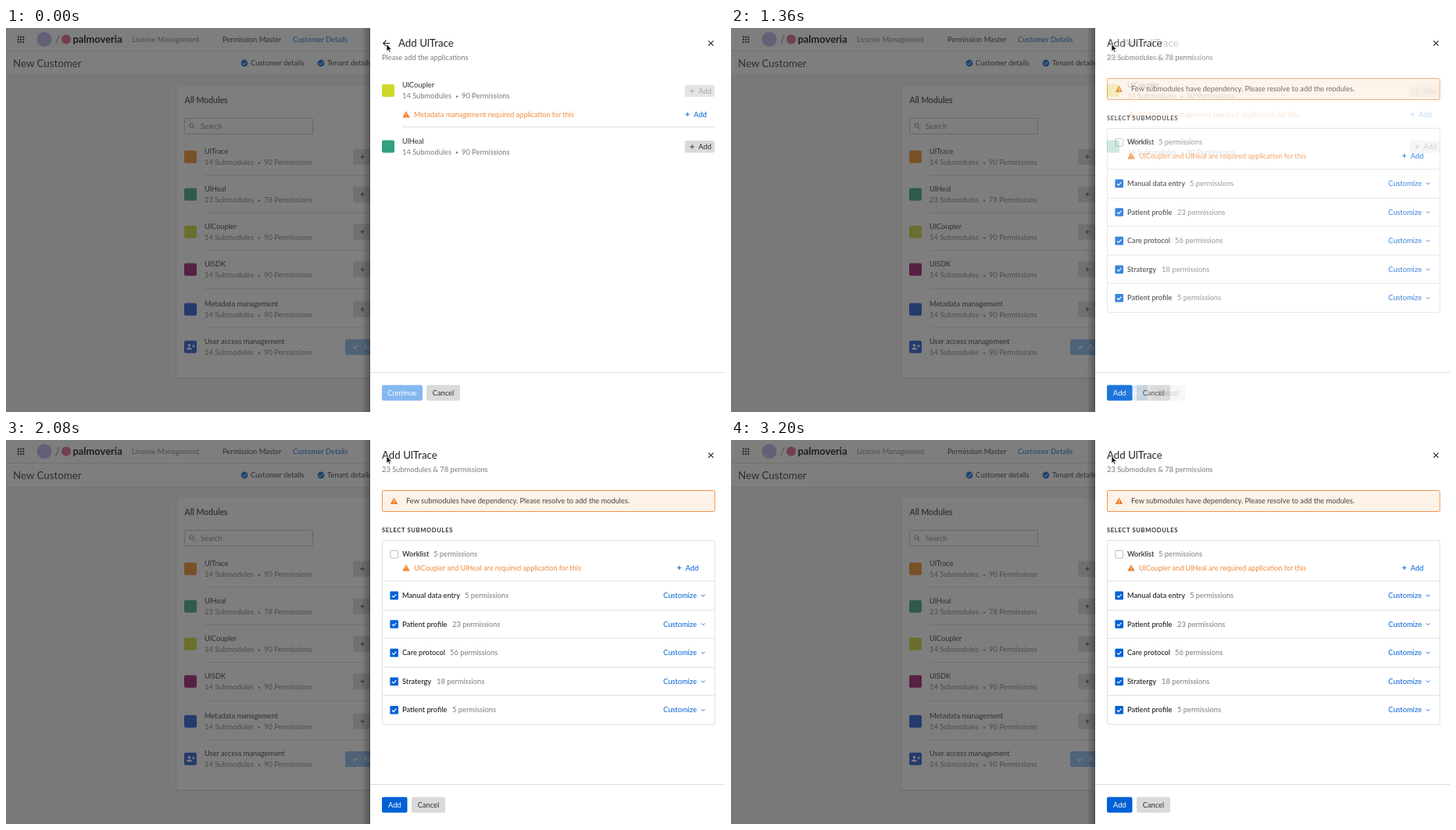
Animation, 920 px wide and 491 px high, one loop 3280 ms. Source, as an HTML page:

```html
<!DOCTYPE html>
<html lang="en">
<head>
<meta charset="utf-8">
<title>Add module dialog</title>
<style>
html, body { margin: 0; width: 100%; height: 100%; overflow: hidden; background: #fff; }
svg { display: block; width: 920px; height: 491px; font-family: Lato, "Open Sans", sans-serif; }
text { white-space: pre; }
</style>
</head>
<body>
<svg id="stage" viewBox="0 0 920 491">
  <defs>
    <linearGradient id="shade">
      <stop offset="0" stop-opacity="0"/>
      <stop offset="1" stop-opacity=".3"/>
    </linearGradient>
  </defs>
  <g id="page"></g>
  <rect width="466" height="491" fill="#2f2f2f" opacity=".62"/>
  <rect x="455" width="11" height="491" fill="url(#shade)"/>
  <g id="panels">
    <g id="apps"></g>
    <g id="modules"></g>
  </g>
  <path d="M487 20.6v9.2l2.1-1.9 1.5 3.3 1.5-.7-1.5-3.2h2.9z" fill="#111" stroke="#fff" stroke-width=".7"/>
</svg>
<script>
const LOOP = 3280, STEP = 80, FADE_AT = 1190, FADE = 300;
const BLUE = '#0061d5', PALE = '#85b8f0', ORANGE = '#f18a3c';
const INK = '#2f2f2f', GREY = '#7b7b7b', FILL = '#dadada';
const YELLOW = '#cfd92b', GREEN = '#30a081';
const $ = id => document.getElementById(id);

// Drawing helpers; text is placed by the middle of its line.
const text = (x, y, s, fill = INK, size = 9.3, weight = 400, more = '') =>
  `<text x="${x}" y="${y + size * .345}" fill="${fill}" font-size="${size}" font-weight="${weight}" ${more}>${s}</text>`;
const rect = (x, y, w, h, fill, r = 0, more = '') =>
  `<rect x="${x}" y="${y}" width="${w}" height="${h}" rx="${r}" fill="${fill}" ${more}/>`;
const line = (d, stroke, w = 1) =>
  `<path d="${d}" fill="none" stroke="${stroke}" stroke-width="${w}"/>`;
const dot = (x, y, r, fill) => `<circle cx="${x}" cy="${y}" r="${r}" fill="${fill}"/>`;
const plus = (x, y, c) => line(`M${x - 2.7} ${y}h5.4M${x} ${y - 2.7}v5.4`, c, .9);
const tick = (x, y, c, w = 1.2) => line(`M${x - 2.6} ${y}l1.9 2 3.5-3.8`, c, w);
const warn = (x, y) =>
  `<path d="M${x} ${y - 4.2}l4.7 8.1h-9.4z" fill="#ef7d24"/>` +
  line(`M${x} ${y - 1.3}v2.5M${x} ${y + 2}v1`, '#fff', .9);
const stats = (x, y, subs, perms) =>
  text(x, y, subs + ' Submodules', GREY) + dot(x + 70, y + .8, 1.2, GREY) +
  text(x + 76, y, perms + ' Permissions', GREY);
const addLink = (x, y, c) => plus(x, y, c) + text(x + 8, y, 'Add', c);

// The page behind the panel, in its own colours; the overlay dims it.
function drawPage() {
  const rows = [
    ['UlTrace', 158, 14, 90, '#f08a1e'],
    ['UlHeal', 206, 23, 78, GREEN],
    ['UlCoupler', 254, 14, 90, YELLOW],
    ['UlSDK', 302, 14, 90, '#960a64'],
    ['Metadata management', 353, 14, 90, '#1450d2'],
    ['User access management', 401, 14, 90, '#1450d2']
  ];
  let s = rect(0, 0, 466, 491, '#f2f2f2') + rect(0, 0, 466, 60, '#fff') +
    line('M0 29.5H466M0 60.5H466', '#e0e0e0');
  for (let i = 0; i < 9; i++)
    s += rect(14.8 + i % 3 * 3.2, 10.6 + (i / 3 | 0) * 3.2, 2, 2, '#111', .4);
  s += dot(49, 14.5, 9.5, '#b9b0ea') + line('M64 20l4-11', GREY) +
    dot(77, 14.5, 6, '#e0568a') + text(85.5, 14.5, 'palmoveria', '#000', 12.9, 700) +
    text(161, 14.5, 'License Management', GREY) +
    text(277, 14.5, 'Permission Master') +
    text(367, 14.5, 'Customer Details', BLUE) +
    text(9, 45.5, 'New Customer', INK, 13.3);
  for (const [x, label] of [[305, 'Customer details'], [403, 'Tenant details']])
    s += dot(x, 45, 4.4, BLUE) + tick(x, 45, '#fff', 1) + text(x + 8, 45.2, label);

  s += rect(217, 74, 260, 374.5, '#dcdcdc', 2) + rect(218, 74, 260, 373, '#fff', 2) +
    text(228.5, 92, 'All Modules', INK, 10.5, 600) +
    rect(228.5, 115.5, 164, 20, 'none', 1, 'stroke="#c4c4c4"') +
    `<circle cx="237.4" cy="124.6" r="2.5" fill="none" stroke="${GREY}"/>` +
    line('M239.3 126.5l2.7 2.7', GREY) + text(249, 125.7, 'Search', GREY);
  rows.forEach(([name, y, subs, perms, color], i) => {
    const mid = y + 6.7, last = i === rows.length - 1;
    s += rect(228, mid - 8, 16, 16, color, 2) + text(254, y, name) + stats(254, y + 14, subs, perms);
    if (last) {
      s += dot(234.5, mid - 2, 1.8, '#fff') +
        `<path d="M231 ${mid + 3.5}q0-2.8 3.5-2.8t3.5 2.8z" fill="#fff"/>` +
        line(`M238 ${mid - 1}h4m-2-2v4`, '#fff') +
        rect(434, 398, 40, 20, PALE, 2) + tick(447, 408, '#fff') + text(457, 408, 'Added', '#fff');
    } else {
      s += rect(444, mid - 10, 40, 20, FILL, 2) + plus(456, mid, INK) +
        line(`M254 ${y + (i === 3 ? 31 : 30)}.5H466`, '#dedede');
    }
  });
  $('page').innerHTML = s;
}

const panel = (title, x, sub) =>
  rect(466, 0, 454, 491, '#fff') +
  text(x, 19.8, title, '#222', 13.3) + text(481, 37.3, sub, GREY) +
  line('M898.8 16.3l6.4 6.4m0-6.4l-6.4 6.4', '#222', 1.1) +
  line('M466 440.5H920', '#dedede');
const button = (x, w, label, fill, color) =>
  rect(x, 456.5, w, 20, fill, 2) +
  text(x + w / 2, 466.6, label, color, 9.3, 400, 'text-anchor="middle"');

function drawApps() {
  const row = (name, y, color, fill, ink) =>
    rect(481, y - 1, 16, 16, color, 2) + text(507, y, name) + stats(507, y + 14, 14, 90) +
    rect(868.5, y - .3, 38, 15.3, fill, 2) + addLink(878, y + 7.5, ink);
  $('apps').innerHTML = panel('Add UlTrace', 502, 'Please add the applications') +
    line('M491 19.5h-8.2m3.8-3.9l-3.9 3.9 3.9 3.9', '#222', 1.1) +
    row('UlCoupler', 73, YELLOW, '#e4e4e4', '#a9a9a9') +
    warn(512, 110.5) + text(522, 110.5, 'Metadata management required application for this', ORANGE, 9.15) +
    addLink(872, 110.4, BLUE) + line('M507 126.5H907', '#dedede') +
    row('UlHeal', 144.4, GREEN, FILL, INK) +
    button(481, 52, 'Continue', PALE, '#fff') + button(538, 43, 'Cancel', FILL, INK);
}

function drawModules() {
  const rows = [
    ['Manual data entry', 5, 587],
    ['Patient profile', 23, 571],
    ['Care protocol', 56, 568],
    ['Stratergy', 18, 551],
    ['Patient profile', 5, 571]
  ];
  let s = panel('Add UlTrace', 481, '23 Submodules &amp; 78 permissions') +
    rect(481.5, 64.5, 425.5, 27, '#fdf2e7', 1.5, 'stroke="#f0964f"') + warn(496.5, 78) +
    text(512, 78, 'Few submodules have dependency. Please resolve to add the modules.', '#444', 9.25) +
    text(481, 115, 'SELECT SUBMODULES', INK, 7.6, 700, 'letter-spacing=".65"') +
    rect(481.5, 128.5, 425.5, 235, '#fff', 1.5, 'stroke="#dfdfdf"') +
    rect(492, 141.5, 9.6, 9.6, '#fff', 1, 'stroke="#bcbcbc"') +
    text(507, 146.2, 'Worklist', INK, 9.2, 600) + text(547, 146.2, '5 permissions', GREY) +
    warn(512, 163.5) + text(522, 163.5, 'UlCoupler and UlHeal are required application for this', ORANGE, 9.15) +
    addLink(861.5, 163.4, BLUE);
  rows.forEach(([name, count, x], i) => {
    const y = 198.8 + i * 36.6;
    s += line(`M482 ${Math.round(y - 18.8) + .5}H907`, '#e2e2e2') +
      rect(491.4, y - 5.2, 10.6, 10.6, BLUE, 1.2) + tick(496.6, y + .3, '#fff') +
      text(507, y, name, INK, 9.2, 600) + text(x, y, count + ' permissions', GREY) +
      text(841, y, 'Customize', BLUE) + line(`M889.8 ${y - 1}l2.2 2.2 2.2-2.2`, BLUE, .9);
  });
  $('modules').innerHTML = s + button(481, 32.5, 'Add', BLUE, '#fff') +
    button(519, 43, 'Cancel', FILL, INK);
}

const easeOut = p => 1 - (1 - p) ** 1.75;

function tickFrame(now) {
  const t = Math.floor(now % LOOP / STEP) * STEP;
  const p = Math.min(1, Math.max(0, (t - FADE_AT) / FADE));
  $('modules').setAttribute('opacity', easeOut(p));
  requestAnimationFrame(tickFrame);
}

drawPage();
drawApps();
drawModules();
tickFrame(performance.now());
</script>
</body>
</html>
```
